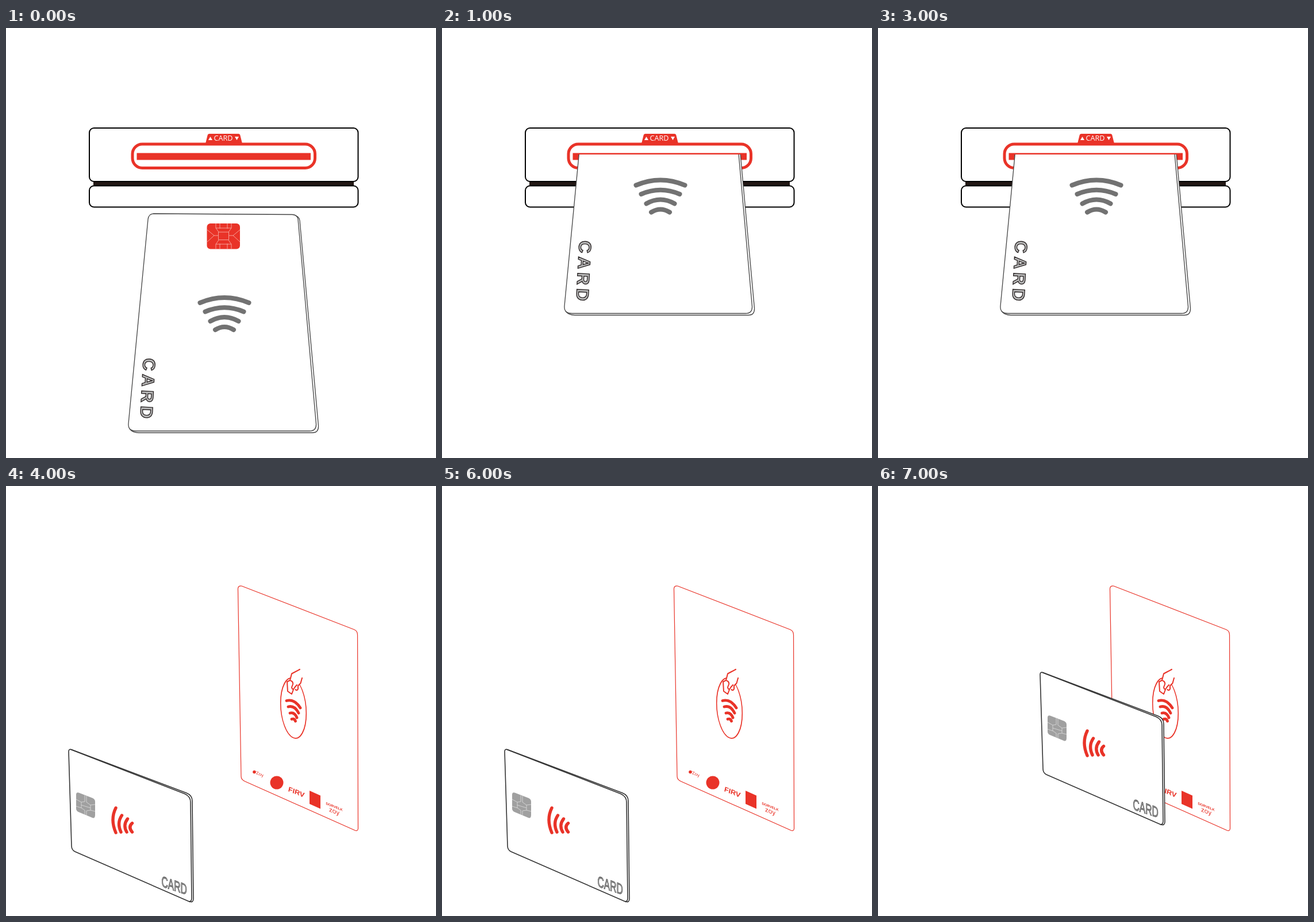
Animation of 748x748 px, one loop 8 s. Source, as an HTML page:

```html
<!DOCTYPE html>
<html lang="en">
<head>
<meta charset="utf-8">
<style>
  html, body { margin: 0; width: 100%; height: 100%; overflow: hidden; background: #fff; }
  svg { display: block; width: 748px; height: 748px; }
  path, rect, ellipse { fill: none; }
  text { font-family: "Liberation Sans", Arial, sans-serif; }
  .red { fill: #e93328; }
  .redline { stroke: #e93328; stroke-linecap: round; stroke-linejoin: round; }
  .case { fill: #fff; stroke: #000; stroke-width: 2; }
  .face { fill: #fff; stroke: #444; stroke-width: 1.3; }
  .dark { stroke: #333; stroke-width: 1.6; }
  .bevel { fill: #bbb; stroke: #2b2626; stroke-width: 1.4; }
  .small { font-weight: bold; }
</style>
</head>
<body>
<svg viewBox="0 0 748 748">
  <defs>
    <clipPath id="belowSlot"><rect x="0" y="220" width="748" height="528"/></clipPath>
  </defs>

  <g id="insertScene">
    <rect x="152" y="266" width="453" height="9" style="fill:#231815"/>
    <rect class="case" x="145" y="174" width="467.500" height="93" rx="8"/>
    <rect class="case" x="145" y="274.500" width="467.500" height="37" rx="8"/>
    <path class="red" d="M347 201L350.500 187Q351 184 354 184H404Q407 184 407.500 187L411 201Z"/>
    <path d="M352 195l3.500-6 3.500 6zM398 189h7l-3.500 6z" style="fill:#fff"/>
    <text x="361.500" y="196.300" font-size="12.600" fill="#fff" style="font-family:'Open Sans',sans-serif">CARD</text>
    <rect class="redline" x="220" y="202" width="317.500" height="41.500" rx="17" stroke-width="5"/>
    <rect class="red" x="227.500" y="217.500" width="302.500" height="12"/>
    <g clip-path="url(#belowSlot)">
      <g id="insertCard">
        <path class="face" d="M258 324L500 326Q510 327 511 335L543.500 692Q544 704 533 704H231Q220 704 215 697Z"/>
        <path class="face" d="M257 323L498 324.500Q507 325 508 333L539.500 689Q540 701 528 701H226Q212 701 213 688L247 333Q248 323 257 323Z"/>
        <rect class="red" x="349.500" y="340" width="57.500" height="44.500" rx="6"/>
        <path d="M369.500 355h18v13.500h-18zM365 340v8l5 7M372 340v9M385 340v9M392 340v8l-5 7M365 384v-8l5-7M372 384v-9M385 384v-9M392 384v-8l-5-7M365 348h27M365 376h27M350 351l12 10h7M350 372l12-11M407 351l-12 10h-7M407 372l-12-11" stroke="#f9b9b2" stroke-width=".8"/>
        <path d="M337.500 478Q380 460 422.500 478M346.500 493.500Q380 479 413.500 493.500M355.500 510Q380 496 404.500 510M364 525Q380 515 396 525" stroke="#727272" stroke-width="8" stroke-linecap="round"/>
        <text class="bevel small" transform="translate(239 574) rotate(93)" font-size="30" letter-spacing="6">CARD</text>
      </g>
    </g>
  </g>

  <g id="tapScene">
    <path class="redline" stroke-width="1.200" d="M403.500 180Q403 173 410 174L605 249.500Q611.500 252 611.500 259L612.500 596Q612 601 607 599L415 513.500Q409 510.500 409 505Z"/>
    <ellipse class="redline" rx="22.300" ry="51.500" transform="matrix(1 .4 0 1 500 386.500)" stroke-width="1.600"/>
    <path d="M497 326L515 334L508 348L503 355L497 362L489 357V341L494 338Z" style="fill:#fff"/>
    <path class="redline" stroke-width="2" d="M511 319L497 326.500L494 338L489 340.500L490 357L497 362L500 354M515 334L512.500 343L508 347.500V353Q506 357 503.500 354M494 338Q500 340 499 345L497 350Q498.500 357 502.500 350L506 346"/>
    <path class="redline" stroke-width="4.800" d="M488 373.500Q502 370 512 386M491 384Q502 381 509 395M494 395Q502 393 506 403M497 405.500Q501.500 404 503.500 409"/>
    <circle class="red" cx="432" cy="497.500" r="2.800"/>
    <circle class="red" cx="471" cy="516" r="11.500"/>
    <path class="red" d="M528 530L547 538.500V561.500L528 553Z"/>
    <text class="red" transform="matrix(1 .4 0 1 435 501)" font-size="7.800">Zoy</text>
    <text class="red small" transform="matrix(1 .4 0 1 491 531)" font-size="12.300" font-style="italic">FIRV</text>
    <text class="red small" transform="matrix(1 .4 0 1 556.500 554)" font-size="6">DORVELK</text>
    <text class="red" transform="matrix(1 .4 0 1 562 566)" font-size="11.500">zoy</text>

    <g id="tapCard">
      <path class="face dark" d="M109 462Q109 457 114 458.500L314 534Q324 538 324 548L326 718Q326 725 319 723L120 636Q114 633 114 626Z"/>
      <path class="dark" d="M113 458.500L311 535.500Q321 540 321 550L323 717Q323 723 318 723"/>
      <path style="fill:#a0a0a0" d="M122 537Q122 532 126.500 533.500L151 543Q155 545 155 549V573Q154.500 579 150 577L126 567Q122 565 122 561Z"/>
      <path d="M122 545l9 5 6-1v-11M122 557l9 3 6 4v8M155 554l-8 1-7-5v-11M155 566l-8-2-7 1v8M131 550v10M147 555v9M131 555l16 5" stroke="#ddd" stroke-width=".8"/>
      <path class="redline" stroke-width="5.400" d="M191 560Q181 580 191 603M201.500 573Q192.500 586 200 602M211.500 579Q203 590 210 602M219.500 586.500Q212 593 219.500 602"/>
      <text class="bevel" transform="matrix(.6 .2 0 1 270.500 696.500)" font-size="26" style="fill:#aaa;stroke:#555;stroke-width:1.1">CARD</text>
    </g>
  </g>
</svg>
<script>
  const el = id => document.getElementById(id);
  const show = (id, on) => el(id).setAttribute("display", on ? "inline" : "none");
  const move = (id, x, y) => el(id).setAttribute("transform", `translate(${x} ${y})`);

  // One hard step per second: four of inserting, four of tapping.
  function draw() {
    const step = Math.floor(performance.now() / 1000) % 8;
    const near = step % 2;
    show("insertScene", step < 4);
    show("tapScene", step >= 4);
    move("insertCard", 0, -204.5 * near);
    move("tapCard", 173 * near, -134 * near);
    requestAnimationFrame(draw);
  }
  draw();
</script>
</body>
</html>
```
